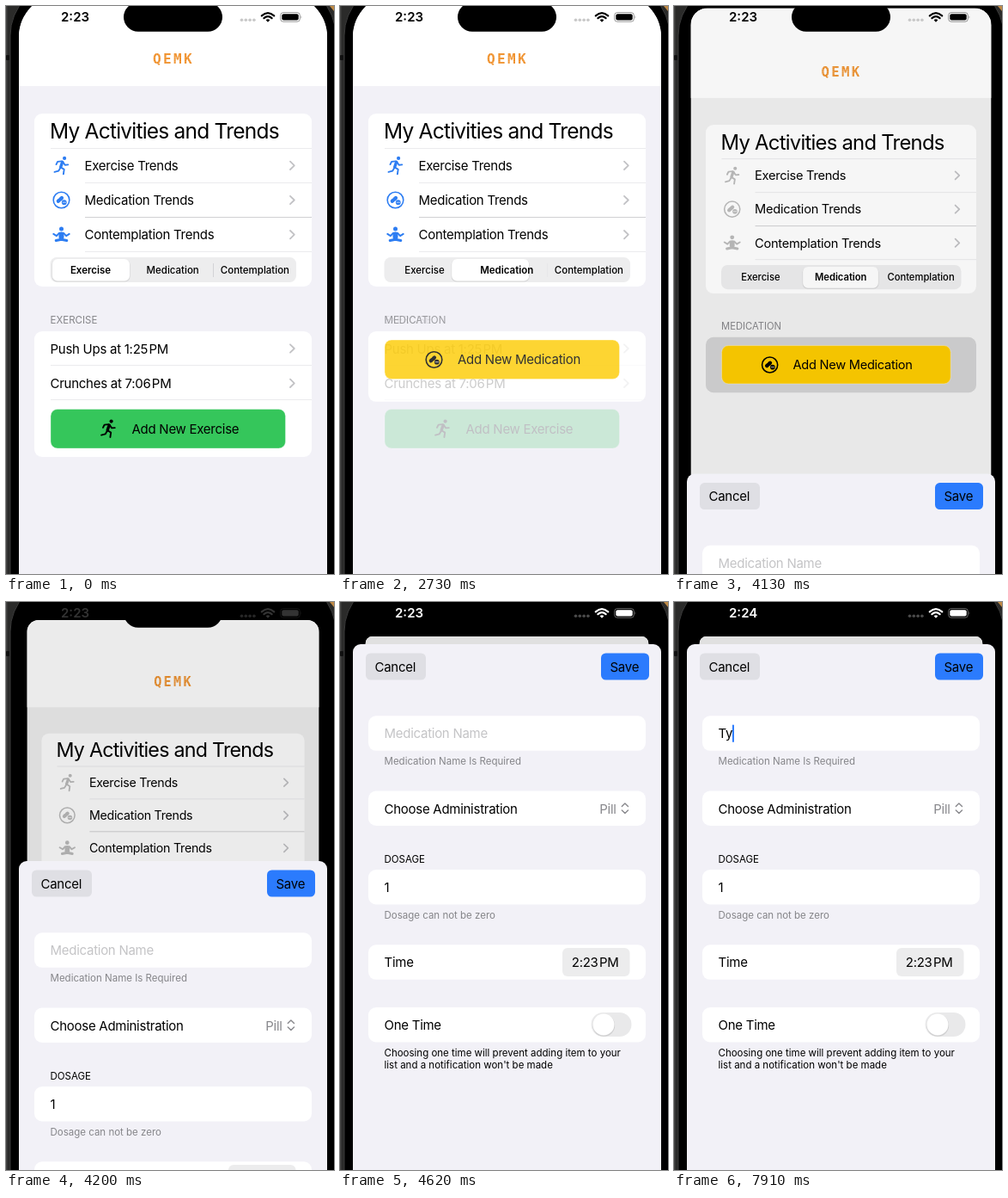
Animation, 382 px wide and 660 px high, one loop 8000 ms. Source, as an HTML page:

```html
<!DOCTYPE html>
<html lang="en">
<head>
<meta charset="utf-8">
<title>Activity tracker</title>
<style>
  html, body { margin: 0; width: 100%; height: 100%; overflow: hidden; background: #000; }
  svg { display: block; width: 382px; height: 660px; font-family: Inter, Roboto, sans-serif; font-optical-sizing: none; }
  text { white-space: pre; }
  .body { font-size: 15px; letter-spacing: -0.27px; }
  .title { font-size: 24.5px; letter-spacing: -0.78px; }
  .small { font-size: 11.5px; }
  .tab { font-size: 11.5px; font-weight: 500; text-anchor: middle; }
  .tab.on { font-weight: 600; }
  .clock { font-size: 15px; font-weight: 600; }
  .brand { font: bold 16px "DejaVu Sans Mono", monospace; letter-spacing: 2.4px; }
  .line { fill: none; stroke-linecap: round; stroke-linejoin: round; }
</style>
</head>
<body>
<svg id="stage" viewBox="0 0 382 660"></svg>
<script>
const LOOP = 8000, STEP = 70;
const GREY = '#858589', PAPER = '#f2f1f7';
const stage = document.getElementById('stage');

const box = (x, y, w, h, r, fill, extra = '') =>
  `<rect x="${x}" y="${y}" width="${w}" height="${h}" rx="${r}" fill="${fill}" ${extra}/>`;
const label = (x, y, str, cls = 'body', fill = '#000', extra = '') =>
  `<text x="${x}" y="${y}" class="${cls}" fill="${fill}" ${extra}>${str}</text>`;
const time = hm => `${hm}<tspan dx="1.4">PM</tspan>`;
const rule = (x, y, color = '#ebebed') => `<path d="M${x} ${y}H356" stroke="${color}"/>`;
const chevron = y =>
  `<path class="line" d="M331 ${y - 4.7}l4.8 4.7l-4.8 4.7" stroke="#c2c2c5" stroke-width="1.8"/>`;
const field = (y, h = 40.5) => box(33, y, 323, h, 9, '#fff');
const button = (y, fill) =>
  box(52, y, 273.5, 45.5, 8, fill, 'stroke="#fff" stroke-opacity=".35"');

// Icons are centred on 0,0 and take the colour of their parent.
const icons = {
  run: `<circle cx="3.6" cy="-8.4" r="2.1" fill="currentColor"/>
    <g class="line" stroke="currentColor" stroke-width="1.9">
      <path d="M1.2-4L-.8 1.8" stroke-width="3.4"/>
      <path d="M1.8-4L4.2-.6L7.8-.9M.4-4.9L-4.4-4.4L-6-1.2M-.6 2.2L3.2 4.6L2.4 10M-1 2.4L-3.4 6.4L-8 7.6"/>
    </g>`,
  pills: `<g class="line" stroke="currentColor">
      <circle r="9.3" stroke-width="1.6"/>
      <path d="M-3.6 1.2L-2.3 0M-.9-1.2L.4-2.4" stroke-width="4.4"/>
    </g>
    <circle cx="3.3" cy="2.7" r="2.9" fill="currentColor"/>
    <path d="M1.2 2.7h4.2" stroke="#fff" stroke-opacity=".75" stroke-width=".9"/>`,
  sit: `<circle cy="-6.6" r="2.5" fill="currentColor"/>
    <rect x="-3" y="-3.2" width="6" height="9" rx="2.4" fill="currentColor"/>
    <g class="line" stroke="currentColor">
      <path d="M-2.6-1.8L-5.6 1.4L-9.2-.8M2.6-1.8L5.6 1.4L9.2-.8" stroke-width="2"/>
      <path d="M-6.2 6.8L0 5.6L6.2 6.8" stroke-width="3.2"/>
    </g>`
};
const icon = (name, x, y) => `<g transform="translate(${x} ${y})">${icons[name]}</g>`;

const trends = [['run', 'Exercise'], ['pills', 'Medication'], ['sit', 'Contemplation']];

const home = `
  <rect id="paper" x="15" y="-14" width="359" height="800"/>
  ${box(15, -14, 359, 107, 0, '#fff')}
  ${label(171, 67, 'QEMK', 'brand', 'url(#pixels)')}
  ${box(33, 125, 323, 201, 9, '#fff')}
  ${label(51, 154.3, 'My Activities and Trends', 'title')}
  ${rule(52, 165.5)}${rule(92, 205.5)}${rule(92, 245.5, '#d0d0d3')}${rule(92, 285.5)}
  ${trends.map(([, name], i) =>
    label(91.5, 190.8 + i * 40.2, name + ' Trends') + chevron(185.3 + i * 40.2)).join('')}
  <g id="glyphs">${trends.map(([name], i) => icon(name, 64.5, 185.3 + i * 40.2)).join('')}</g>
  ${box(51.5, 292, 286.5, 29, 7.5, '#ededee')}
  <path id="tabRule" d="M241.5 299V315" stroke="#d3d3d6"/>
  <g id="thumb">${box(53.5, 294.5, 91, 26, 6, '#000', 'opacity=".1"')}
    ${box(54, 294, 90, 25.5, 6, '#fff')}</g>
  ${trends.map(([, name], i) => label(98.5 + i * 95.7, 311, name, 'tab')).join('')}
  <rect id="list" x="33" y="378" width="323" rx="9"/>
  <g id="exercise">
    ${label(51.5, 369, 'EXERCISE', 'small', GREY)}
    ${label(51.5, 403.6, 'Push Ups at ' + time('1:25'))}${chevron(398)}${rule(52, 417.5)}
    ${label(51.5, 443.8, 'Crunches at ' + time('7:06'))}${chevron(438.3)}${rule(52, 457.5)}
    ${button(468.5, '#35c65b')}
    ${icon('run', 119, 491)}
    ${label(146.5, 496.7, 'Add New Exercise')}
  </g>
  <g id="medication">
    ${label(51.5, 369, 'MEDICATION', 'small', GREY)}
    ${button(388, '#fdcb00')}
    ${icon('pills', 109.5, 411)}
    ${label(137, 416.3, 'Add New Medication')}
  </g>
  <rect id="dim" x="15" y="-14" width="359" height="800"/>`;

const sheet = `
  ${box(15, 49, 359, 800, 9, PAPER)}
  ${box(30, 59.5, 70, 31, 5.5, '#dfdfe4')}${label(40.5, 80.6, 'Cancel')}
  ${box(304, 59.5, 56, 31, 5.5, '#2b7bfd')}${label(314.5, 80.6, 'Save')}
  ${field(132.3)}
  ${label(51.5, 158.4, '', 'body', '#000', 'id="entry"')}
  <rect id="caret" y="142.5" width="2" height="20.5" rx="1" fill="#2b7bfd"/>
  ${label(51.5, 189.3, 'Medication Name Is Required', 'small', GREY)}
  ${field(219.5)}
  ${label(51.5, 245.6, 'Choose Administration')}
  ${label(302.3, 245.6, 'Pill', 'body', '#88888c')}
  <path class="line" d="M328.3 237.5l3.6-3.4l3.6 3.4M328.3 242l3.6 3.4l3.6-3.4" stroke="#88888c" stroke-width="1.4"/>
  ${label(51.5, 302.8, 'DOSAGE', 'small')}
  ${field(311)}${label(51.5, 337, '1')}
  ${label(51.5, 368.3, 'Dosage can not be zero', 'small', GREY)}
  ${field(398.3)}${label(51.5, 424.3, 'Time')}
  ${box(259, 402, 78.5, 33, 6, '#ececed')}
  ${label(269.8, 424.3, time('2:23'))}
  ${field(471)}${label(51.5, 497, 'One Time')}
  ${box(292.5, 477, 47, 28, 14, '#e9e9ea')}
  <circle cx="307.2" cy="492" r="13" opacity=".1"/><circle cx="307" cy="491" r="12.5" fill="#fff"/>
  ${label(51.5, 528, 'Choosing one time will prevent adding item to your', 'small')}
  ${label(51.5, 542.3, "list and a notification won't be made", 'small')}`;

const status = `
  ${label(64, 18.3, '2:23', 'clock', 'currentColor', 'id="clock"')}
  <g id="dots" fill="currentColor">${[274.5, 279.3, 284.1, 288.9].map(x =>
    `<circle cx="${x}" cy="16.2" r="1.8"/>`).join('')}</g>
  <g class="line" stroke="currentColor" stroke-width="2.2" stroke-linecap="butt">
    <path d="M297.8 11.4Q305 5 312.2 11.4M300.4 14.2Q305 10.2 309.6 14.2"/>
  </g>
  <path d="M302.6 16.2Q305 14.2 307.4 16.2L305 18.7Z" fill="currentColor"/>
  <rect x="319.7" y="7.6" width="22.6" height="10.6" rx="3.2" fill="none" stroke="currentColor" opacity=".4"/>
  <rect x="321.3" y="9.2" width="19.4" height="7.4" rx="2" fill="currentColor"/>
  <path d="M343.6 11.2q1.6 1.7 0 3.4z" fill="currentColor" opacity=".5"/>`;

stage.innerHTML = `
  <defs>
    <clipPath id="screen"><rect x="15" y="-14" width="359" height="800" rx="50"/></clipPath>
    <clipPath id="card"><rect id="cardEdge" x="15" y="-14" width="359" height="800"/></clipPath>
    <pattern id="pixels" x="171" y="55" width="2.4" height="2.4" patternUnits="userSpaceOnUse">
      <rect width="2.4" height="2.4" fill="#f7c48c"/><rect width="2" height="2" fill="#ee8414"/>
    </pattern>
  </defs>
  ${box(0, 0, 382, 660, 0, '#2b2b2a')}
  ${box(0, 0, 1.5, 660, 0, '#444443')}
  <path d="M377 0H382V6Z" fill="#c08a45"/>
  ${box(5, -26, 379, 860, 60, '#000', 'stroke="#3b3b3b" stroke-width="1"')}
  ${box(0, 57, 4, 6, 1, '#111')}
  <g clip-path="url(#screen)">
    <g id="home"><g clip-path="url(#card)">${home}</g></g>
    <g id="status">${status}</g>
    ${box(137, -4, 115, 33.8, 16.9, '#000')}
    <g id="sheet">${sheet}</g>
  </g>`;

const el = Object.fromEntries([...stage.querySelectorAll('[id]')].map(n => [n.id, n]));
const tabs = stage.querySelectorAll('.tab');
const set = (node, attrs) => { for (const k in attrs) node.setAttribute(k, attrs[k]); };
const clamp = v => Math.min(1, Math.max(0, v));
const ramp = (t, from, to) => clamp((t - from) / (to - from));
const smooth = v => v * v * (3 - 2 * v);
const grey = v => `rgb(${v},${v},${v})`;

// Share of the sheet's travel that remains: a critically damped spring.
function remaining(t) {
  if (t < 4130) return 1;
  if (t >= 4620) return 0;
  const x = (t - 4058.4) * 0.01557;
  return (1 + x) * Math.exp(-x);
}

// The caret fades out and in over three steps; typing keeps it solid.
function caretOpacity(t) {
  if (t < 5740) return 0;
  if (t >= 7700) return 1;
  const fade = from => ramp(t, from - STEP, from + 2 * STEP);
  return 1 - fade(6370) + fade(6720) - fade(7420);
}

function render(now) {
  const t = Math.floor((now % LOOP) / STEP) * STEP;
  const presenting = t >= 4130;

  const k = smooth(ramp(t, 2380, 2870));
  const picked = t >= 2450 ? 1 : 0;
  tabs.forEach((tab, i) => tab.classList.toggle('on', i === picked));
  set(el.thumb, { transform: `translate(${95 * k} 0)` });
  set(el.tabRule, { opacity: 1 - k });
  set(el.exercise, { opacity: 1 - k });
  set(el.medication, { opacity: k });
  set(el.list, { height: 146 - 80 * k, fill: t >= 3920 ? '#d1d1d2' : '#fff' });

  const rest = remaining(t), p = 1 - rest;
  set(el.home, {
    transform: `translate(194.5 ${-14 + 54 * p}) scale(${1 - 0.081 * p}) translate(-194.5 14)`
  });
  set(el.cardEdge, { rx: 9 + 16 * rest });
  set(el.paper, { fill: presenting ? '#f0f0f0' : PAPER });
  set(el.dim, { opacity: 0.12 * p });
  set(el.sheet, { transform: `translate(0 ${713 * rest})` });
  el.glyphs.style.color = presenting ? '#bcbcbc' : '#2d7df2';

  const lit = ramp(t, 4130, 4480);
  el.status.style.color = grey(Math.round(255 * lit));
  el.dots.style.color = grey(lit ? Math.round(30 + 45 * lit) : 200);
  el.clock.textContent = t >= 5740 ? '2:24' : '2:23';

  const typed = t >= 7910 ? 'Ty' : t >= 7700 ? 'T' : '';
  el.entry.textContent = typed || 'Medication Name';
  set(el.entry, { fill: typed ? '#000' : '#c4c4c6' });
  const end = typed ? el.entry.getComputedTextLength() : 0;
  set(el.caret, { x: 51.3 + end, opacity: caretOpacity(t) });
}

const start = performance.now();
function frame() {
  render(performance.now() - start);
  requestAnimationFrame(frame);
}
frame();
</script>
</body>
</html>
```
